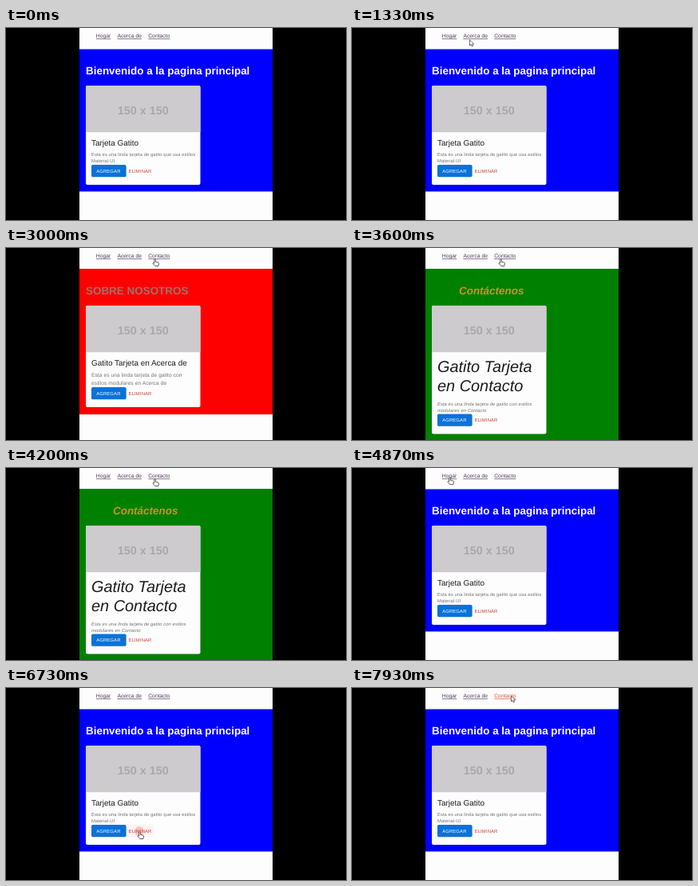
An HTML page that plays this animation: 426x240 px, repeating every 8000 ms.

```html
<!DOCTYPE html>
<html lang="es">
<head>
<meta charset="utf-8">
<title>Tarjetas</title>
<style>
  html, body { margin: 0; width: 100%; height: 100%; overflow: hidden; background: #000; }
  svg { display: block; width: 100vw; height: 100vh; }
  text { font-family: "Liberation Sans", Arial, sans-serif; text-rendering: geometricPrecision; white-space: pre; }
  .link { font-size: 6.8px; fill: #513a5c; text-decoration: underline; }
  .heading { font-size: 13.44px; font-weight: bold; }
  .sample { font-size: 14.4px; font-weight: bold; fill: #a9a9a9; }
  .title { fill: #1c1c1c; }
  .body { fill: #747474; letter-spacing: .0105em; }
  .button { font-size: 5.83px; letter-spacing: .0286em; }
  .italic { font-style: italic; }
</style>
</head>
<body>
<svg id="stage" viewBox="0 0 426 240"></svg>
<script>
const LOOP = 8000;
const stage = document.getElementById('stage');

const pages = [
  { color: '#00f', top: 26.5, bottom: 204.4, cardBottom: 196, buttonY: 171,
    heading: 'Bienvenido a la pagina principal', headingX: 100, headingColor: '#fff',
    title: ['Tarjeta Gatito'], titleSize: 9.95, titleY: 147.2, titleStep: 0,
    body: ['Esta es una linda tarjeta de gatito que usa estilos', 'Material-UI'],
    bodySize: 5.83, bodyY: 160, bodyStep: 8.3, style: '' },
  { color: '#f00', top: 26, bottom: 208, cardBottom: 199, buttonY: 174,
    heading: 'SOBRE NOSOTROS', headingX: 100, headingColor: '#a0706c',
    title: ['Gatito Tarjeta en Acerca de'], titleSize: 9.95, titleY: 147.2, titleStep: 0,
    body: ['Esta es una linda tarjeta de gatito con', 'estilos modulares en Acerca de'],
    bodySize: 6.63, bodyY: 160.6, bodyStep: 10, style: '' },
  { color: '#008000', top: 26, bottom: 240, cardBottom: 232.5, buttonY: 207.5,
    heading: 'Contáctenos', headingX: 134, headingColor: '#d28c2e',
    title: ['Gatito Tarjeta', 'en Contacto'], titleSize: 19.9, titleY: 155.4, titleStep: 23.3,
    body: ['Esta es una linda tarjeta de gatito con estilos', 'modulares en Contacto'],
    bodySize: 5.83, bodyY: 197, bodyStep: 8.3, style: 'italic' }
];

const rect = (x, y, w, h, fill, rx = 0, extra = '') =>
  `<rect x="${x}" y="${y}" width="${w}" height="${h}" fill="${fill}" rx="${rx}" ${extra}/>`;
const text = (x, y, content, cls, extra = '') =>
  `<text x="${x}" y="${y}" class="${cls}" ${extra}>${content}</text>`;
const lines = (list, y, step, size, cls) =>
  list.map((line, i) => text(107, y + i * step, line, cls, `font-size="${size}"`)).join('');

function pageMarkup(p) {
  return `<g class="page">
    ${rect(92, p.top, 242, p.bottom - p.top, p.color)}
    ${text(p.headingX, 57.8, p.heading, 'heading ' + p.style, `fill="${p.headingColor}"`)}
    ${rect(100, 72.8, 143.5, p.cardBottom - 72.4, '#000', 2, 'opacity=".25"')}
    ${rect(100, 72, 143.5, p.cardBottom - 72, '#fdfdfd', 2)}
    <path d="M100 130.3V74q0-2 2-2h139.5q2 0 2 2v56.3z" fill="#cdcbce"/>
    ${text(171.8, 108.1, '150 x 150', 'sample', 'text-anchor="middle"')}
    ${lines(p.title, p.titleY, p.titleStep, p.titleSize, 'title ' + p.style)}
    ${lines(p.body, p.bodyY, p.bodyStep, p.bodySize, 'body ' + p.style)}
    ${rect(107, p.buttonY + .6, 43.5, 15, '#000', 1.7, 'opacity=".3"')}
    ${rect(107, p.buttonY, 43.5, 15, '#0a72d8', 1.7)}
    ${text(113.2, p.buttonY + 9.6, 'AGREGAR', 'button', 'fill="#fff"')}
    <g class="hover">${rect(151.5, p.buttonY, 34, 15, '#fdf3f3', 1.7)}
      <circle class="ripple" cx="167" cy="${p.buttonY + 8}" fill="#f3b4b4"/></g>
    ${text(153.6, p.buttonY + 9.6, 'ELIMINAR', 'button', 'fill="#cb3f32"')}
  </g>`;
}

stage.innerHTML = rect(92, 0, 242, 240, '#fdfdfd') +
  text(112.8, 12.4, 'Hogar', 'link') +
  text(139.4, 12.4, 'Acerca de', 'link') +
  text(178.2, 12.4, 'Contacto', 'link') +
  pages.map(pageMarkup).join('') +
  `<g id="cursor" fill="#fff" stroke="#333" stroke-width=".7" stroke-linejoin="round">
    <path d="M-.5.8v7.2l1.7-1.5 1.2 2.6 1.2-.6-1.1-2.4h2.2z"/>
    <path transform="translate(.6 .4) scale(1.12)"
      d="M-.8.8q.8-1 1.5 0v2.7l3 .7q.8.3.7 1.2l-.6 2.8h-3.6l-2.6-3q.2-1.2 1.6-.2z"/>
  </g>`;

const pageNodes = [...stage.querySelectorAll('.page')];
const links = [...stage.querySelectorAll('.link')];
const hovers = [...stage.querySelectorAll('.hover')];
const ripples = [...stage.querySelectorAll('.ripple')];
const cursor = document.getElementById('cursor');
const [arrow, hand] = cursor.children;

// Pointer stops: time, x, y
const path = [
  [800, 150, 50], [1250, 148, 14], [1400, 148, 14], [1600, 152, 11], [1900, 152, 11],
  [2700, 186, 13], [4350, 186, 13], [4750, 122, 11], [5000, 122, 11],
  [5500, 128, 131], [5560, 128, 131], [5900, 129, 179], [6200, 129, 179],
  [6500, 167, 179], [7000, 167, 179], [7700, 200, 9], [8000, 200, 9]
];
// Page changes: time, page
const visits = [[0, 0], [1750, 1], [3350, 2], [4850, 0]];

const clamp = v => Math.max(0, Math.min(1, v));
const ease = v => v * v * (3 - 2 * v);

function pointerAt(t) {
  const i = path.findIndex(stop => stop[0] > t);
  if (i < 1) return path[0].slice(1);
  const [t0, x0, y0] = path[i - 1], [t1, x1, y1] = path[i];
  const k = ease((t - t0) / (t1 - t0));
  return [x0 + (x1 - x0) * k, y0 + (y1 - y0) * k];
}

function draw(t) {
  const page = visits.filter(([start]) => start <= t).pop()[1];
  const [x, y] = pointerAt(t);
  const buttonY = pages[page].buttonY;
  const overButton = y > buttonY && y < buttonY + 15 && x > 107 && x < 186;
  const overLink = y > 6 && y < 13.6 && [[113, 131], [139, 170], [178, 199]].some(([a, b]) => x > a && x < b);
  const pressed = t > 7850;

  pageNodes.forEach((node, i) => node.style.display = i === page ? '' : 'none');
  hovers[page].style.display = overButton && x > 151 ? '' : 'none';
  const k = clamp((t - 6550) / 300);
  ripples[page].setAttribute('r', 9 * ease(k));
  ripples[page].setAttribute('opacity', .75 * clamp((6980 - t) / 200));
  links[2].style.fill = pressed ? '#d9542b' : '';

  cursor.style.display = t < 800 ? 'none' : '';
  cursor.setAttribute('transform', `translate(${x} ${y})`);
  const pointing = overButton || overLink;
  arrow.style.display = pointing ? 'none' : '';
  hand.style.display = pointing ? '' : 'none';
}

function tick() {
  draw(performance.now() % LOOP);
  requestAnimationFrame(tick);
}
tick();
</script>
</body>
</html>
```
